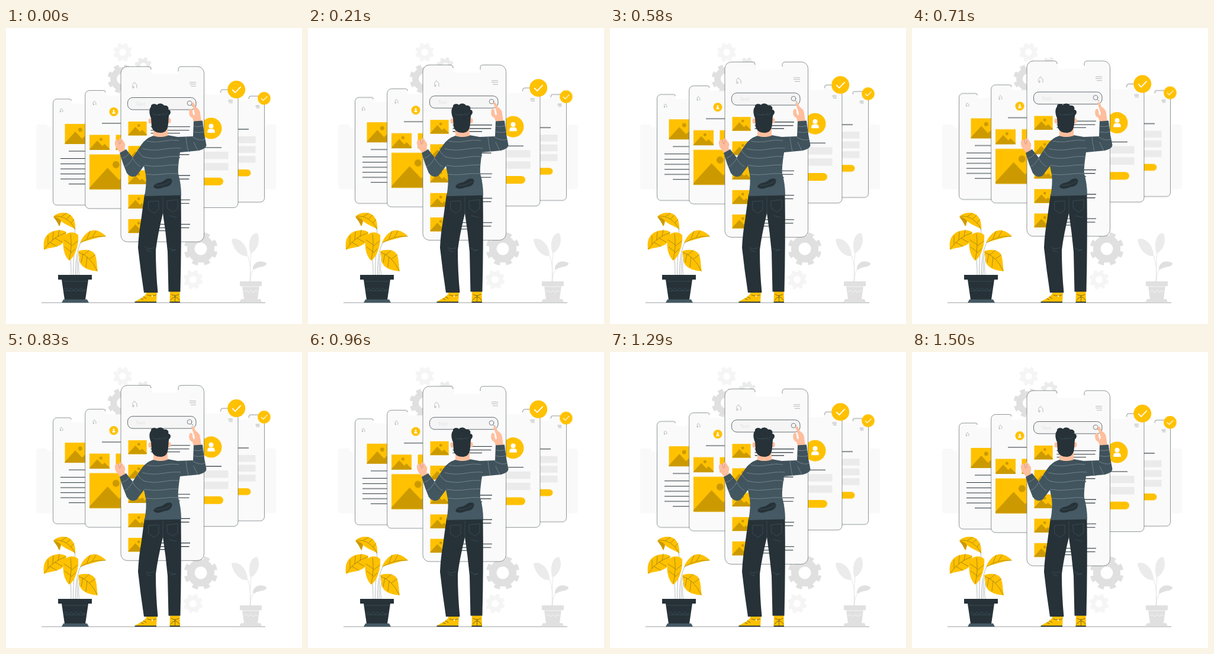
Animation of 500x500 px, one loop 1.54 s. Source, as an HTML page:

```html
<!DOCTYPE html>
<html lang="en">
<head>
<meta charset="utf-8">
<title>Mobile search</title>
<style>
  html, body { margin: 0; width: 100%; height: 100%; overflow: hidden; background: #fff; }
  svg { display: block; width: 100%; height: 100%; }
  .float { animation: float 1540ms -5ms infinite; }
  @keyframes float {
    0% { transform: translateY(0); animation-timing-function: steps(18); }
    48.701% { transform: translateY(-10px); animation-timing-function: steps(18); }
    97.403%, 100% { transform: translateY(0); }
  }
  .y { fill: #ffc100; }
  .d { fill: #263238; }
  .m { fill: #455a64; }
  .skin { fill: #ffbe9d; }
  .g { fill: #ebebeb; }
  .ink, .ln, .seam, .knit, .check { fill: none; stroke: #263238; stroke-width: .6; stroke-linecap: round; stroke-linejoin: round; }
  .ln { stroke-width: 1.1; stroke-linecap: butt; }
  .vein { stroke-width: .5; stroke-opacity: .75; }
  .seam { stroke: #455a64; stroke-width: .6; }
  .knit { stroke: #9aa8ae; stroke-width: .55; }
  .check { stroke: #fff; stroke-width: 1.8; }
  .edge, .icon { fill: none; stroke: #263238; stroke-width: .6; vector-effect: non-scaling-stroke; }
  .edge { stroke-opacity: .85; }
  .icon { stroke-width: .5; stroke-opacity: .65; }
  .hint { font: 8px Lato, sans-serif; fill: #e0e0e0; letter-spacing: .2px; }
</style>
</head>
<body>
<svg viewBox="0 0 500 500">
  <defs>
    <path id="shell" d="M11 0H46q5 0 5 5v3q0 5 5 5H92q5 0 5-5v-3q0-5 5-5H129.500a11 11 0 0 1 11 11V285a11 11 0 0 1-11 11H11a11 11 0 0 1-11-11V11A11 11 0 0 1 11 0z"/>
    <g id="phone">
      <use href="#shell" fill="#fafafa"/>
      <path class="edge" d="M129.500 0a11 11 0 0 1 11 11V285a11 11 0 0 1-11 11H11a11 11 0 0 1-11-11V11A11 11 0 0 1 11 0H44"/>
      <path class="edge" d="M44 0h2q5 0 5 5M97 8v-3q0-5 5-5H129.500" stroke-opacity=".35"/>
      <path class="icon" d="M19.500 30.500l3.500-4 4 4.500v5.500M20 31v5h2v-3M116 26.500h11M116 29.500h11M118 33h9"/>
    </g>
    <g id="gear" fill="none" stroke="currentColor">
      <circle r="59" stroke-width="44"/>
      <circle r="88" stroke-width="24" pathLength="16" stroke-dasharray="1"/>
    </g>
    <g id="pic">
      <rect class="y" width="80" height="60"/>
      <path d="M0 57L31 23 51 44 60 36 80 55V60H0z" fill="#cc9a00"/>
      <circle cx="45.500" cy="17.500" r="6" fill="#cc9a00"/>
    </g>
    <g id="user">
      <circle class="y" r="18"/>
      <circle cy="-3.800" r="4" fill="#fff"/>
      <path d="M-6.300 7.500V5.500Q-6 1-2.500 1H2.500Q6 1 6.300 5.500V7.500z" fill="#fff"/>
    </g>
    <g id="badge">
      <circle class="y" r="15"/>
      <path class="check" d="M-6.500 .6L-2 5 7-4.400"/>
    </g>
    <g id="row">
      <use href="#pic" transform="scale(.39)"/>
      <path class="ln" stroke-width=".9" d="M38 8.700h66.500M38 14.700H103M38 19.700H87.500"/>
    </g>
    <linearGradient id="wool" gradientUnits="userSpaceOnUse" x1="0" y1="180" x2="0" y2="275">
      <stop stop-color="#3f515a"/><stop offset="1" stop-color="#455a64"/>
    </linearGradient>
  </defs>

  <g fill="#f9f9f9">
    <use href="#shell" transform="translate(51 163)scale(.37)"/>
    <use href="#shell" transform="translate(404 163)scale(.37)"/>
  </g>
  <use href="#gear" color="#f5f5f5" transform="translate(197 41)rotate(10)scale(.16)"/>
  <use href="#gear" color="#ebebeb" transform="translate(232 64)rotate(5)scale(.145)"/>
  <use href="#gear" color="#e0e0e0" transform="translate(196 86)rotate(8)scale(.245)"/>
  <use href="#gear" color="#e0e0e0" transform="translate(329 373)rotate(10)scale(.285)"/>
  <use href="#gear" color="#f5f5f5" transform="translate(316 425)rotate(6)scale(.165)"/>

  <g class="float">
    <use href="#phone" transform="translate(79.500 120)scale(.605)"/>
    <use href="#pic" transform="translate(99.500 162)scale(.567)"/>
    <path class="ln" d="M106 208h30M92 220.500h44M92 229.500h44M92 238h44M92 246.500h44M92 255h44M106 263.500h30"/>

    <use href="#phone" transform="translate(351.500 115)scale(.605)"/>
    <path class="ln" d="M380 171h30"/>
    <path class="g" d="M380 183h41.500v11.500H380zM380 199.500h41.500V211H380zM380 216h41.500v11.500H380z"/>
    <rect class="y" x="375" y="239" width="38.500" height="11.500" rx="5.750"/>

    <use href="#phone" transform="translate(133.700 105.500)scale(.674)"/>
    <use href="#user" transform="translate(182 141.500)scale(.42)"/>
    <path class="ln" d="M162 161h36"/>
    <use href="#pic" transform="translate(141 180.500)scale(.425)"/>
    <use href="#pic" transform="translate(185.500 180.500)scale(.425)"/>
    <use href="#pic" transform="translate(141 213.500)scale(.985)"/>

    <use href="#phone" transform="translate(297.300 104)scale(.674)"/>
    <use href="#user" transform="translate(346.500 169.500)"/>
    <path class="ln" d="M328 202h36"/>
    <path class="g" d="M316 209h59.500v12.500H316zM316 228h59.500v12.500H316z"/>
    <rect class="y" x="322" y="252.700" width="45" height="13" rx="6.500"/>

    <use href="#phone" transform="translate(194 65.200)"/>
    <rect x="205.500" y="117.500" width="115.500" height="20.500" rx="8.500" fill="#f5f5f5" stroke="#263238" stroke-width=".7"/>
    <text class="hint" x="219.500" y="131">Text</text>
    <circle class="ink" cx="310" cy="127" r="3.800"/>
    <path class="ink" d="M313 130l3 3"/>
    <use href="#row" x="206.500" y="158"/>
    <use href="#row" x="206.500" y="199.200"/>
    <use href="#row" x="206.500" y="240.400"/>
    <use href="#row" x="206.500" y="281.600"/>
    <use href="#row" x="206.500" y="322.800"/>

    <use href="#badge" transform="translate(389.200 104)"/>
    <use href="#badge" transform="translate(436 118.800)scale(.72)"/>
  </g>

  <path d="M60 464H438" stroke="#263238" stroke-width=".6" stroke-opacity=".8"/>

  <!-- potted plant -->
  <path class="ink" d="M110 417Q110 400 109 390M113.500 417C113 385 119 360 116 338M117.500 417C117 395 120 374 126 363M120 417C121 402 119 390 123 380M123.500 417Q121 398 125 386" stroke-opacity=".55"/>
  <g class="y">
    <path d="M117 340C118 325 112 312 97 312 89 312 83 315 80 319 85 323 87 329 91 335L93 326C101 333 110 335 117 340z"/>
    <path d="M102 345C95 339 75 340 67 353 62 361 64 371 64 375 72 370 92 372 98 360z"/>
    <path d="M125 363C130 350 140 341 150 341.500 160 343 166 349 169 352 158 353 142 357 125 363z"/>
    <path d="M122 377C132 373 145 374 150 382 154 391 153 402 155 411 146 410 130 408 125 396 123 390 124 384 122 377z"/>
    <path d="M122 350C123 364 118 385 107 393 98 386 94 366 98 352 103 344 116 343 122 350z"/>
  </g>
  <path d="M80 319Q88 319 93 326L90 335Q86 326 80 319z" fill="#cc9a00"/>
  <path class="ink vein" d="M82 318Q104 316 117 340M94 318l8-5M103 322l6-6M110 329l5-6
    M65 373Q79 353 101 346M71 365l0-14M79 358l1-14M88 352l2-11M74 362l12 7M83 355l12 7
    M107 391Q112 368 109 348M110 378l-11-8M110 366l-12-8M110 380l7-7M111 368l10-8
    M126 363Q145 350 168 352M137 356l5-13M146 353l6-10
    M123 379Q143 386 154 410M132 383l9-8M141 390l10-7M130 382l-3 14M137 387l-2 17"/>
  <path class="d" d="M88 417H145V425H139L134 459H99L94 425H88z"/>
  <path class="m" d="M97 458.500H137L140 464H94z"/>
  <path class="seam" d="M95 428H138M98 441l4-2 4 4 4-4 4 4 4-4 4 4 4-4 4 4 4-2M98 444H135"/>

  <!-- pale plant -->
  <path d="M408 384Q415 402 412 428M414 380Q412 400 412.500 428M419 407Q413 412 413 428" fill="none" stroke="#e0e0e0" stroke-width=".8"/>
  <path class="g" d="M381 357C392 352 408 365 408 385 396 387 383 374 381 357z"/>
  <path class="g" d="M413 381C408 365 412 347 424 346 430 356 427 374 413 381z"/>
  <path d="M417 408C416 397 428 390 440 397 440 405 428 402 421 407z" fill="#e0e0e0"/>
  <path d="M395 428H432V436H428L425 458H402L399 436H395zM397 458H430L432 463.500H394z" fill="#e0e0e0"/>
  <path d="M399 437H428M402 446l4-3 4 4 4-4 4 4 4-4 3 3" fill="none" stroke="#f5f5f5"/>

  <!-- man -->
  <path class="y" d="M237 446H255L254 464H217.500C219 459 230 458 237 449zM277 444H293.500L294 464H276.500z"/>
  <path class="d" d="M217.500 462.300H254V464H217.500zM276.500 462.300H294V464H276.500z"/>
  <path class="ink" d="M232 454l5 3M228 457l4 2M239 451q7 3 14 0M279 450q6 4 13 0M285.500 452V462M278 460q3-5 7.500-6 5 1 7.500 6"/>
  <circle cx="247" cy="453" r="1.200" fill="#fff"/>
  <path class="d" d="M234 281H295.500Q296.500 360 294.500 445.500H274.500L273 378Q270 345 265 313 256 350 253 375 253 412 256.500 447H233Q227 408 223 371 224 348 228.500 322z"/>
  <path class="seam" d="M241 293l17-1v15l-8 6-9-6zM272 292l18-2v15l-8 6-9-6zM265 286V313M236 371q6 4 14 0M237 375q4 2 8 3M274 371q6 5 13 4M280 377l7-3M276 317l12 3"/>
  <path class="skin" d="M193 211C189 206 184 201 184 195 183 190 187 188 190 189 192 185 197 186 198 191 202 194 202 199 200 203L204 207z"/>
  <path class="ink" d="M190 189q-1 4 2 7M194 190q1 4-2 6" stroke-opacity=".4"/>
  <path class="skin" d="M313 126C315 124 319 127 320 133 325 136 327.500 139 328 144L330 158H317L315 152C310 150 308 145 310 138 313 135 316 138 315 143L317 148 319 146C319 141 316 136 313 126z"/>
  <path fill="url(#wool)" d="M249 182Q261 186 273 181L290 184 316 183 317 157.500 332 156.500Q334 178 338.500 198 338 204 326 207L294 210Q290 235 291 246 296 264 296 282.500L234 284Q238 262 236 248L233 233 221 249Q212 255 204 245 197 229 192 211L203 205 214 219 228 198Q236 186 249 182z"/>
  <path class="knit" d="M238 191q14 3 28 0t26-1M231 204q17 4 34 1t30-2M233 218q16 4 31 1t28-2M234 232q15 3 29 1t28-2M236 247q14 2 28 0t27-1
    M317 166q8 2 16-1M316 175q9 3 19 0M304 184q1 12 4 25M315 184q12 8 21 4M317 193q4 8 7 14M197 220q6-2 11-8M201 234q7-3 13-14M222 206q4 8 11 12M214 220q5 10 13 14"/>
  <path class="d" d="M249 268C252 260 262 263 268 257 273 253 281 253 280.500 259 279 267 272 268 266 269 260 272 252 273 249 268z"/>
  <path class="seam" d="M253 266q13 1 25-7"/>
  <path class="skin" d="M249 168H273V182Q261 186 249 182z"/>
  <ellipse class="skin" cx="243.500" cy="157" rx="3" ry="4.500"/>
  <ellipse class="skin" cx="275.500" cy="156.500" rx="3" ry="4.500"/>
  <path class="d" d="M245 152C242 146 241 137 245 133 244 128 252 127 255 130 258 126 265 127 267 131 272 130 276 134 274 138 279 138 279 145 275.500 147 274 152 275 160 273 168 271 175 266 177 261 177 254 177 248 174 246 167z"/>
  <path class="seam" d="M248 144q3 4 7 3t5-2M258 147q5 1 9-3M266 147q4 0 6-4"/>
</svg>
</body>
</html>
```
